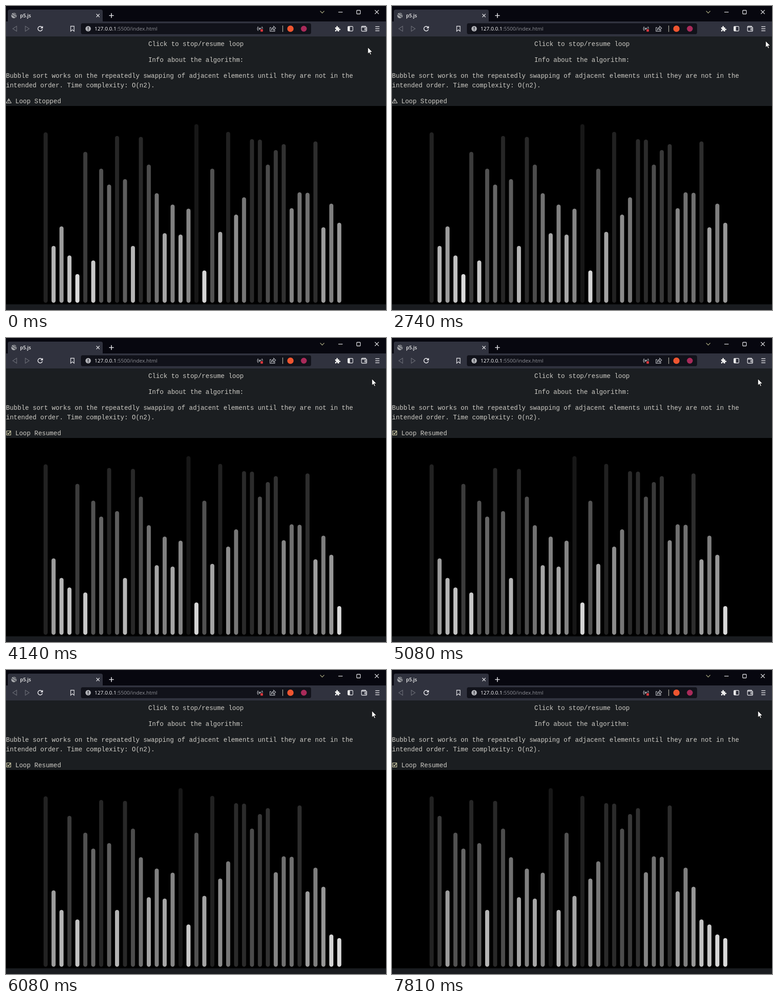
Animation, 837 px wide and 669 px high, one loop 8000 ms. Source, as an HTML page:

```html
<!DOCTYPE html>
<html lang="en">
<head>
<meta charset="utf-8">
<title>Bubble sort</title>
<style>
  html, body { margin: 0; width: 100%; height: 100%; overflow: hidden; background: #000; }
  svg { display: block; width: 837px; height: 669px; }
  .ui { font-family: "Open Sans", "Noto Sans", sans-serif; }
  .page { font: 14px "Liberation Mono", "Courier New", monospace; fill: #cfcdc7; white-space: pre; }
  .line { fill: none; stroke: #e6e6ea; stroke-width: 1.3; }
</style>
</head>
<body>
<svg viewBox="0 0 837 669" xmlns="http://www.w3.org/2000/svg">
  <!-- window -->
  <rect width="837" height="35" fill="#07070f"/>
  <path d="M4 34V12q0-4 4-4H209q4 0 4 4V34Z" fill="#30323e"/>
  <rect y="34" width="837" height="33" fill="#30323e"/>
  <rect x="165" y="38" width="507" height="24" rx="4" fill="#11121a"/>
  <rect y="67" width="837" height="154" fill="#1b1e21"/>
  <rect y="220" width="837" height="437" fill="#000"/>
  <rect y="656.5" width="837" height="13" fill="#1a1c20"/>

  <!-- tab -->
  <circle cx="17.5" cy="21" r="6" fill="#a5a7ab"/>
  <path d="M12 19q3 0 4 2t3 1t1 4M17 15.500q0 3 3 2.500t2 3" fill="none" stroke="#3c3e48" stroke-width="1.500"/>
  <text class="ui" x="31" y="25" font-size="10.800" font-weight="600" fill="#f2f2f2">p5.js</text>
  <g class="line">
    <path d="M199 17.500l7 7m0-7l-7 7"/>
    <path d="M227 21h10.500M232.250 15.800v10.500" style="stroke-width:1.700"/>
    <path d="M692 11l4.500 4.500l4.500-4.500" style="stroke:#a9a880"/>
    <path d="M732 13.500h9.500"/>
    <rect x="772.500" y="9.500" width="8" height="8" rx="1"/>
    <path d="M812.500 9l8.500 8.500m0-8.500l-8.500 8.500"/>
  </g>

  <!-- toolbar -->
  <g class="line">
    <path d="M23.500 44.500v11l-8.500-5.500Z" style="stroke:#686a73"/>
    <path d="M42.500 44.500v11l8.500-5.500Z" style="stroke:#686a73"/>
    <path d="M79.500 47.300a5 5 0 1 0 .6 3.800M80.500 44.500v3.800h-4" style="stroke-width:1.700"/>
    <path d="M142.500 44.500h7.500v11l-3.750-3.200l-3.750 3.200Z"/>
    <path d="M555.500 45.500q-3.500 4.500 0 9M558 47.500q-2 2.500 0 5M563.500 45.500q2 2 1.800 4.500M561 47.500q1 1 1 2.500" style="stroke:#b9bac0"/>
    <path d="M584 47.500h-2.500v8h10.500v-3M584.500 52.500q.5-5 5-5v-3l4.500 4.300l-4.500 4.200v-2.800q-3-.2-5 2.300Z" style="stroke:#aeb0b6"/>
    <path d="M609.500 43v14" style="stroke:#b6b3a4"/>
    <rect x="753" y="45" width="11" height="10" rx="1.500"/>
    <path d="M783 46.500q0-2 2-2h7v2M783 46.500v7q0 2 2 2h8.500q1 0 1-1v-7q0-1-1-1H783M794.500 49.500h-4v3h4"/>
    <path d="M813.500 45.500h9M813.500 50h9M813.500 54.500h9"/>
  </g>
  <rect x="753" y="45" width="4.500" height="10" fill="#eee"/>
  <circle cx="181" cy="50" r="6" fill="#b0b1b6"/>
  <path d="M181 46.500v4.300M181 52v1.500" stroke="#15161e" stroke-width="1.600"/>
  <text class="ui" x="195" y="54" font-size="11.450" fill="#8f9097"><tspan fill="#f6f6f8">127.0.0.1</tspan>:5500/index.html</text>
  <circle cx="559.500" cy="50" r="1.300" fill="#c8c8cc"/>
  <rect x="560.500" y="51" width="5.500" height="5.500" rx="1" fill="#d8363c"/>
  <circle cx="626.500" cy="50" r="7" fill="#ee5530"/>
  <circle cx="656" cy="50" r="6.500" fill="#a92a5a"/>
  <path d="M725 47h3q-1-3 1.300-3t1.400 3h3v3.200q3-1 3 1.200t-3 1.200V56h-3.200q0-2.500-1.600-2.500T727.500 56H725v-3q2.300 0 2.300-1.500T725 50Z" fill="#eee"/>

  <!-- page text -->
  <g class="page">
    <text x="418.500" y="88" text-anchor="middle">Click to stop/resume loop</text>
    <text x="418.500" y="123" text-anchor="middle">Info about the algorithm:</text>
    <text x="0" y="158">Bubble sort works on the repeatedly swapping of adjacent elements until they are not in the</text>
    <text x="0" y="179">intended order. Time complexity: O(n2).</text>
    <text id="status" x="20.500" y="214"></text>
  </g>
  <g id="warn" fill="none" stroke="#d2d0ca" stroke-width="1.200" stroke-linejoin="round">
    <path d="M6 204.200L11.500 213.500H.7Z"/>
    <path d="M6 207v3.300M6 211.200v1.200" stroke-width="1.500"/>
  </g>
  <g id="check" fill="none" stroke="#d8d4ae" stroke-width="1.200">
    <rect x="1.500" y="204.500" width="9" height="9"/>
    <path d="M3.500 208.700l2 2.500l4-5.500" stroke-width="1.500"/>
  </g>

  <g id="bars" stroke-width="9" stroke-linecap="round"></g>
  <path id="cursor" d="M0 0V14.200L3.300 11.200L5.500 16.300L7.700 15.300L5.500 10.400H10Z" fill="#fff" stroke="#000" stroke-width=".8"/>
</svg>
<script>
  const LOOP = 8000, BOTTOM = 653, RANGE = 432;
  const tops = [278, 528, 485, 549, 590, 321, 560, 358, 393, 286, 381, 528, 288,
    349, 412, 500, 437, 503, 446, 260, 582, 358, 497, 277, 459, 421, 293, 294,
    349, 317, 304, 445, 410, 411, 298, 487, 435, 477];
  const passTimes = [4140, 5180, 6240, 7280];
  // time, x, y
  const path = [[0, 797, 91], [670, 797, 91], [1040, 823, 77],
    [2740, 823, 77], [2810, 806, 90], [LOOP, 806, 90]];

  const el = id => document.getElementById(id);

  // One descending bubble pass: the smallest remaining bar moves right.
  function pass(list) {
    const a = [...list];
    for (let i = 0; i < a.length - 1; i++)
      if (a[i] > a[i + 1]) [a[i], a[i + 1]] = [a[i + 1], a[i]];
    return a;
  }

  const states = [tops];
  for (const _ of passTimes) states.push(pass(states.at(-1)));

  const bars = tops.map((_, i) => {
    const bar = document.createElementNS("http://www.w3.org/2000/svg", "line");
    const x = 87.3 + 17.48 * i;
    bar.setAttribute("x1", x);
    bar.setAttribute("x2", x);
    bar.setAttribute("y2", BOTTOM - 4.5);
    el("bars").append(bar);
    return bar;
  });

  function showState(n) {
    bars.forEach((bar, i) => {
      const top = states[n][i];
      const grey = Math.round(255 * (1 - (BOTTOM - top) / RANGE));
      bar.setAttribute("y1", top + 4.5);
      bar.setAttribute("stroke", `rgb(${grey},${grey},${grey})`);
    });
    const running = n > 0;
    el("status").textContent = running ? "Loop Resumed" : "Loop Stopped";
    el("warn").style.display = running ? "none" : "";
    el("check").style.display = running ? "" : "none";
  }

  function cursorAt(t) {
    const k = path.findIndex(p => p[0] > t);
    const [t0, x0, y0] = path[k - 1], [t1, x1, y1] = path[k];
    const u = (t - t0) / (t1 - t0);
    return [x0 + (x1 - x0) * u, y0 + (y1 - y0) * u];
  }

  let shown = -1;
  const start = performance.now();
  function frame() {
    const t = Math.max(0, performance.now() - start) % LOOP;
    const n = passTimes.filter(p => p <= t).length;
    if (n !== shown) showState(shown = n);
    el("cursor").setAttribute("transform", `translate(${cursorAt(t).map(Math.round)})`);
    requestAnimationFrame(frame);
  }
  frame();
</script>
</body>
</html>
```
